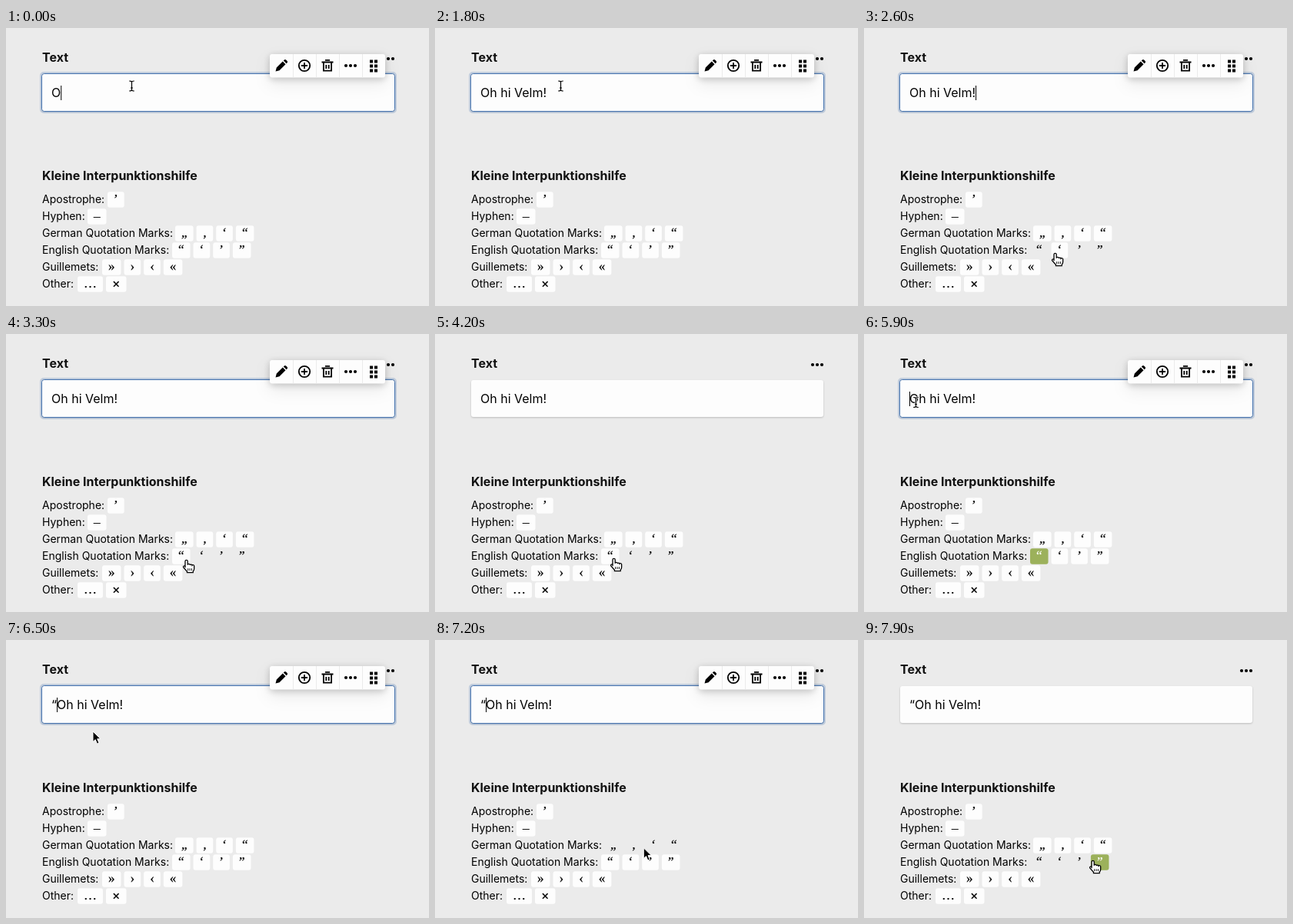
An HTML page that plays this animation: 550 by 362 pixels, repeating every 8 s.

```html
<!DOCTYPE html>
<html lang="de">
<head>
<meta charset="utf-8">
<title>Interpunktionshilfe</title>
<style>
  html, body { margin: 0; height: 100%; overflow: hidden; background: #ebebeb; }
  svg { display: block; width: 100vw; height: 100vh; }
  text { font: 16px Inter, sans-serif; fill: #000; white-space: pre; }
  .head { font-weight: 700; fill: #111; }
  .label { font-size: 14px; }
  .key text { font: 17px "Liberation Serif", serif; stroke: #000; stroke-width: .25; }
  .key text.cross { font: 12.5px "DejaVu Sans", sans-serif; }
  .key rect { fill: #fdfdfd; }
  .key.faded rect { fill: none; }
  .key.copied rect { fill: #9cb15b; }
  .key.copied text { fill: #fff; stroke: #fff; }
  .field { filter: drop-shadow(0 1px 1.3px rgba(0, 0, 0, .2)); }
  .bar { filter: drop-shadow(0 2px 5px rgba(0, 0, 0, .2)) drop-shadow(0 8px 10px rgba(0, 0, 0, .08)); }
  .line { fill: none; stroke: #000; stroke-width: 1.8; }
</style>
</head>
<body>
<svg viewBox="0 0 550 362">
  <text class="head" x="47" y="44">Text</text>
  <circle cx="491" cy="40" r="2.1"/><circle cx="497" cy="40" r="2.1"/><circle cx="503" cy="40" r="2.1"/>
  <rect class="field" x="47" y="60" width="458" height="48" rx="3" fill="#fdfdfd"/>
  <g id="focus">
    <rect x="45" y="58" width="462" height="52" rx="4" fill="none" stroke="#4271ae" stroke-opacity=".25" stroke-width="2"/>
    <rect x="46.5" y="59.5" width="459" height="49" rx="3" fill="none" stroke="#4271ae"/>
    <rect class="bar" x="343" y="34" width="150" height="30.5" rx="3" fill="#fdfdfd"/>
    <path d="M373.5 34v30.5m30-30.5v30.5m30-30.5v30.5m30-30.5v30.5" stroke="#ebebeb"/>
    <path d="M350.5 56.5l1.3-5 8-8 3.7 3.7-8 8zM360.8 42.5l1-1q1.2-1 2.3 0l1.5 1.5q1 1.1 0 2.2l-1 1z"/>
    <g class="line">
      <circle cx="388" cy="49" r="7.2"/>
      <path d="M384 49h8m-4-4v8M410.5 44.5h15M415 41.9h6M412.9 44.5v11.2h10.2V44.5M416.3 48v5M419.7 48v5"/>
    </g>
    <circle cx="442" cy="49" r="2.1"/><circle cx="448" cy="49" r="2.1"/><circle cx="454" cy="49" r="2.1"/>
    <path d="M475 41.5v16m6-16v16" stroke="#000" stroke-width="4" stroke-dasharray="4 2"/>
  </g>
  <text id="value" x="59" y="90"></text>
  <rect id="caret" y="75" width="1" height="19"/>
  <text class="head" x="47" y="198">Kleine Interpunktionshilfe</text>
  <g id="rows"></g>
  <g id="beam">
    <path d="M-3.3-6.5q3.3 0 3.3 1.5 0-1.5 3.3-1.5M-3.3 6.5q3.3 0 3.3-1.5 0 1.5 3.3 1.5M0-5V5M-1.5 2.5h3" fill="none" stroke="#fff" stroke-width="2.6"/>
    <path d="M-3.3-6.5q3.3 0 3.3 1.5 0-1.5 3.3-1.5M-3.3 6.5q3.3 0 3.3-1.5 0 1.5 3.3 1.5M0-5V5M-1.5 2.5h3" fill="none" stroke="#000" stroke-width="1.2"/>
  </g>
  <path id="arrow" d="M0 0V13.6L3.2 10.7 5.5 16.2 8 15.1 5.7 9.8H10z" stroke="#fff"/>
  <g id="hand" stroke="#000">
    <g transform="translate(-1.4 .7) scale(1.08 1)">
      <path d="M-1.5 9.5V1.2a1.5 1.5 0 0 1 3 0V6a1.4 1.4 0 0 1 2.8.2 1.4 1.4 0 0 1 2.6.4 1.3 1.3 0 0 1 2.4.8V11q0 2-1.3 3.2V16H.8V14.6L-3.6 9.2a1.3 1.3 0 0 1 2.1-1.5z" fill="#fff" stroke-width="1.2"/>
      <path d="M1.9 10.5v3m2.2-3v3m2.2-3v3" stroke-width=".9"/>
    </g>
  </g>
</svg>
<script>
const $ = id => document.getElementById(id);

function add(parent, name, attrs, text = "") {
  const el = document.createElementNS("http://www.w3.org/2000/svg", name);
  for (const key in attrs) el.setAttribute(key, attrs[key]);
  el.textContent = text;
  return parent.appendChild(el);
}

// Label, left edge of the first key, glyphs
const rows = [
  ["Apostrophe:", 132, "’"],
  ["Hyphen:", 106, "–"],
  ["German Quotation Marks:", 220, "„‚‘“"],
  ["English Quotation Marks:", 216, "“‘’”"],
  ["Guillemets:", 125, "»›‹«"],
  ["Other:", 93, "…✕"],
].map(([label, x, glyphs], i) => {
  const y = 223 + i * 22;
  add($("rows"), "text", { class: "label", x: 47, y: y + 5 }, label);
  const keys = [...glyphs].map(glyph => {
    const el = add($("rows"), "g", { class: "key" });
    const box = add(el, "rect", { x, y: y - 9.8, height: 20.5, rx: 3 });
    const sign = add(el, "text", { x: x + 8, y: y + 5, class: glyph === "✕" ? "cross" : "" }, glyph);
    const width = sign.getComputedTextLength() + 16;
    box.setAttribute("width", width);
    const key = { el, left: x, right: x + width };
    x += width + 4;
    return key;
  });
  return { y, keys };
});

const [openQuote, , , closeQuote] = rows[3].keys;
const message = "Oh hi Velm!";
const typedAt = [0, 100, 300, 400, 500, 700, 900, 1000, 1100, 1200, 1300];
const caretOn = [[0, 1800], [2400, 2900], [3500, 4000], [5500, 6000], [6100, 6600], [7100, 7600]];

// Pointer stops: time, x, y
const stops = [
  [0, 163.5, 75.5], [1800, 163.5, 75.5], [2600, 250, 293], [3000, 264, 302], [3300, 236, 294],
  [3600, 234, 292], [4400, 234, 292], [5300, 67.5, 89], [6200, 67.5, 89],
  [6500, 113, 119], [7100, 256, 258], [7600, 299, 287], [8000, 299, 287],
];

// Slope at a stop; zero where the pointer rests
function slope(k, axis) {
  const before = stops[k - 1], here = stops[k], after = stops[k + 1];
  if (!before || !after || before[1] === here[1] || after[1] === here[1]) return 0;
  return (after[axis] - before[axis]) / (after[0] - before[0]);
}

function pointer(t, axis) {
  const k = stops.findIndex(stop => stop[0] > t) - 1;
  const a = stops[k], b = stops[k + 1], span = b[0] - a[0], u = (t - a[0]) / span;
  const ease = u * u * (3 - 2 * u);
  return a[axis] + (b[axis] - a[axis]) * ease
    + span * u * (1 - u) * (slope(k, axis) * (1 - u) - slope(k + 1, axis) * u);
}

const between = (v, low, high) => v >= low && v < high;
const show = (id, on) => $(id).setAttribute("visibility", on ? "visible" : "hidden");

function draw(t) {
  const x = pointer(t, 1), y = pointer(t, 2);
  let cursor = between(x, 47, 505) && between(y, 60, 108) ? "beam" : "arrow";

  for (const row of rows) {
    const last = row.keys[row.keys.length - 1];
    const rowHover = between(y, row.y - 10, row.y + 11) && between(x, row.keys[0].left, last.right);
    for (const key of row.keys) {
      const hover = rowHover && between(x, key.left, key.right);
      if (hover) cursor = "hand";
      const copied = key === openQuote && between(t, 4300, 6300) || key === closeQuote && t >= 7900;
      key.el.classList.toggle("faded", rowHover && !hover);
      key.el.classList.toggle("copied", copied);
    }
  }

  for (const id of ["beam", "arrow", "hand"]) show(id, id === cursor);
  $(cursor).setAttribute("transform", `translate(${x} ${y})`);

  const typed = typedAt.filter(at => at <= t).length;
  const quoted = t >= 6100;
  const caretIndex = t < 5500 ? typed : +quoted;
  const value = $("value");
  value.textContent = (quoted ? "“" : "") + message.slice(0, typed);
  $("caret").setAttribute("x", 59 + (caretIndex ? value.getSubStringLength(0, caretIndex) : 0));
  show("caret", caretOn.some(([from, to]) => between(t, from, to)));
  show("focus", t < 4200 || between(t, 5500, 7800));
}

function tick() {
  draw(Math.floor(performance.now() % 8000 / 100) * 100);
  requestAnimationFrame(tick);
}
tick();
</script>
</body>
</html>
```
